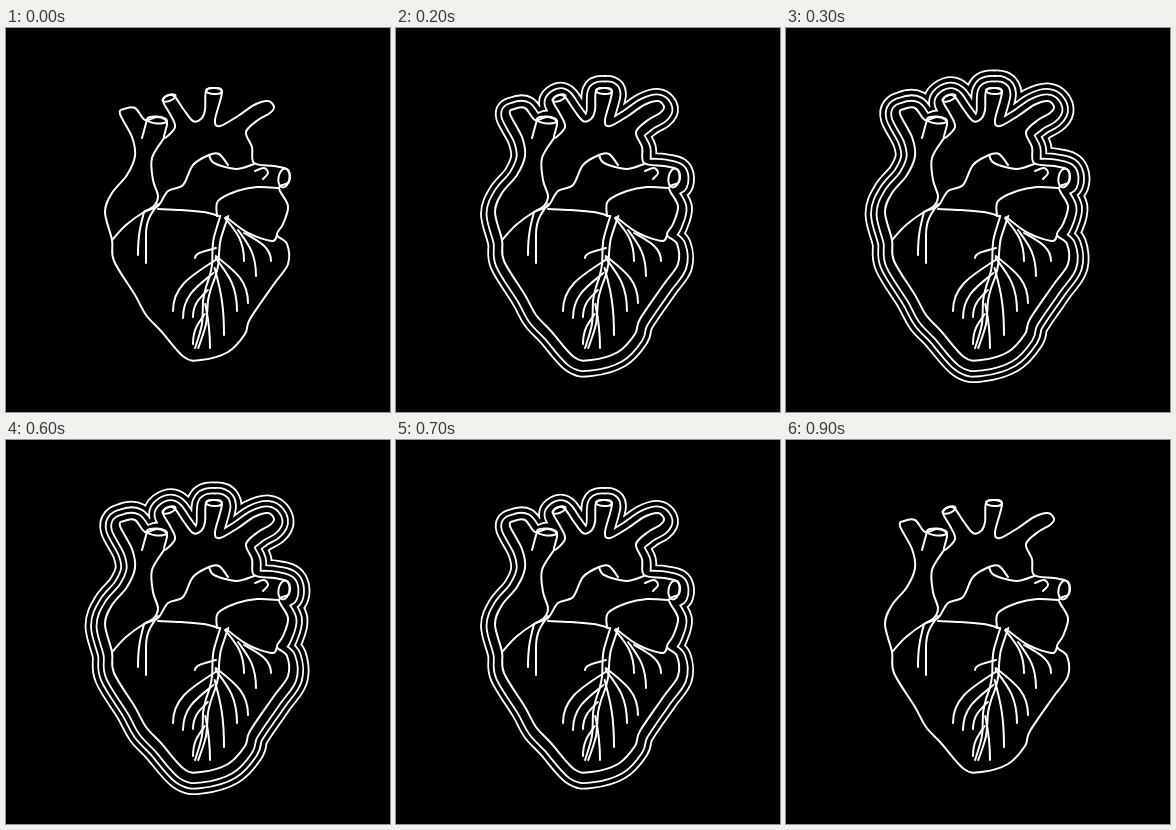
Recreate the animation shown at these times as an HTML page. Size 384 by 384 pixels, loop 1000 ms.

```html
<!DOCTYPE html>
<html lang="en">
<head>
<meta charset="utf-8">
<title>Beating heart</title>
<style>
html, body { margin: 0; width: 100%; height: 100%; overflow: hidden; background: #000; }
svg { display: block; width: 100vw; height: 100vh; }
path, ellipse { fill: none; stroke: #fff; stroke-width: 2; stroke-linecap: round; stroke-linejoin: round; }
</style>
</head>
<body>
<svg viewBox="0 0 384 384"><g id="halos" transform="translate(0 2)"></g><g id="heart"></g></svg>
<script>
const NS = 'http://www.w3.org/2000/svg';
const heart = document.getElementById('heart');
const halos = document.getElementById('halos');

function add(parent, tag, attrs = {}) {
  const el = document.createElementNS(NS, tag);
  for (const k in attrs) el.setAttribute(k, attrs[k]);
  parent.appendChild(el);
  return el;
}

// Catmull-Rom spline through the points
function smooth(pts, closed) {
  const n = pts.length;
  const at = i => pts[closed ? (i + n) % n : Math.max(0, Math.min(n - 1, i))];
  let d = 'M' + pts[0];
  for (let i = 0; i < (closed ? n : n - 1); i++) {
    const [a, b, c, e] = [at(i - 1), at(i), at(i + 1), at(i + 2)];
    const p = b.map((v, k) => v + (c[k] - a[k]) / 6);
    const q = c.map((v, k) => v - (e[k] - b[k]) / 6);
    d += `C${p} ${q} ${c}`;
  }
  return d;
}

const parse = s => s.trim().split(/\s+/).map(p => p.split(',').map(Number));
const stroke = d => add(heart, 'path', { d });
const line = s => stroke(smooth(parse(s)));
const rim = (cx, cy, rx, ry, turn) =>
  add(heart, 'ellipse', { cx, cy, rx, ry, transform: `rotate(${turn} ${cx} ${cy})` });

// Leaves sideways, then hangs down to its tip
const twig = (x, y, tx, ty) => stroke(
  `M${x} ${y}C${x + (tx - x) * 0.55} ${y + (ty - y) * 0.3} ${tx} ${y + (ty - y) * 0.5} ${tx} ${ty}`);

// Outer contour, clockwise from the left vessel
const contour = smooth(parse(`114,86 118,81 129,80 139,92 151,89 161,94 158,110
  169,99 164,86 157,73 163,67 169,69 178,82 187,93 195,91 199,82 200,63 208,60 216,64
  209,92 214,98 232,88 248,77 262,73 268,79 264,85 252,92 240,104 246,119 248,135
  268,138 282,142 283,154 273,160 282,178 277,196 271,207 281,216 282,236
  268,256 244,291 239,306 222,324 195,332 178,329 155,303 140,287 129,267 108,233
  106,212 99,184 106,165 121,147 129,128 126,109`), true) + 'Z';
add(heart, 'path', { d: contour, 'stroke-width': 2.3 });

// Vessels and chambers
rim(151, 92, 10, 3.5, 5);
rim(163, 70, 7, 3, -22);
rim(208, 63, 8, 3, 3);
rim(278, 150, 5.5, 9.5, 10);
line('141,92 139,99 136,110');
line('158,110 146,130 147,152 152,168 148,178 138,184');
line('106,212 120,197 138,184 152,178 162,163 177,157 187,137 203,127 213,126 222,137');
line('203,127 208,135 230,141 248,136');
line('249,143 258,140 262,145 257,151');
line('152,181 175,182 198,184 213,188');
line('273,160 251,159 231,163 212,173 211,188');
line('271,207 266,213 242,205 220,189');

// Coronary trunk: two edges that close toward the tip
const trunkX = y => 217 - (y - 188) * 0.19 + 1.5 * Math.sin(y / 9);
for (const side of [-1, 1]) {
  const edge = [];
  for (let y = 188; y <= 320; y += 12) {
    edge.push([trunkX(y) + side * (4 - (y - 188) / 55), y]);
  }
  stroke(smooth(edge));
}

// Twigs of the trunk: fork height, tip
for (const [y, tx, ty] of [
  [220, 189, 230], [232, 167, 283], [245, 177, 290], [262, 187, 289], [286, 187, 316],
  [276, 204, 320], [240, 218, 307], [230, 231, 283], [228, 242, 275]
]) twig(trunkX(y), y, tx, ty);

// Side branches
twig(219, 190, 238, 233);
twig(232, 202, 250, 248);
twig(238, 205, 265, 233);
twig(138, 184, 132, 227);
twig(152, 176, 140, 207);
twig(140, 207, 140, 235);

// Halos are parallel curves: a wide stroke with its inside covered, widest first
const rings = [];
for (let i = 3; i >= 0; i--) {
  const r = 8.5 + 5.5 * i;
  const g = add(halos, 'g');
  for (const [color, edge] of [['#fff', 0.9], ['#000', -0.9]]) {
    add(g, 'path', { d: contour, style: `stroke:${color};fill:#000;stroke-width:${2 * (r + edge)}` });
  }
  rings[i] = g;
}

// Halos grow one by one, rest, then shrink back
function draw(ms) {
  const step = Math.floor((ms % 1000) / 100);
  const count = Math.min(step, 4, 9 - step);
  rings.forEach((g, i) => g.setAttribute('visibility', i < count ? 'visible' : 'hidden'));
}

const start = performance.now();
function tick() {
  draw(performance.now() - start);
  requestAnimationFrame(tick);
}
tick();
</script>
</body>
</html>
```
